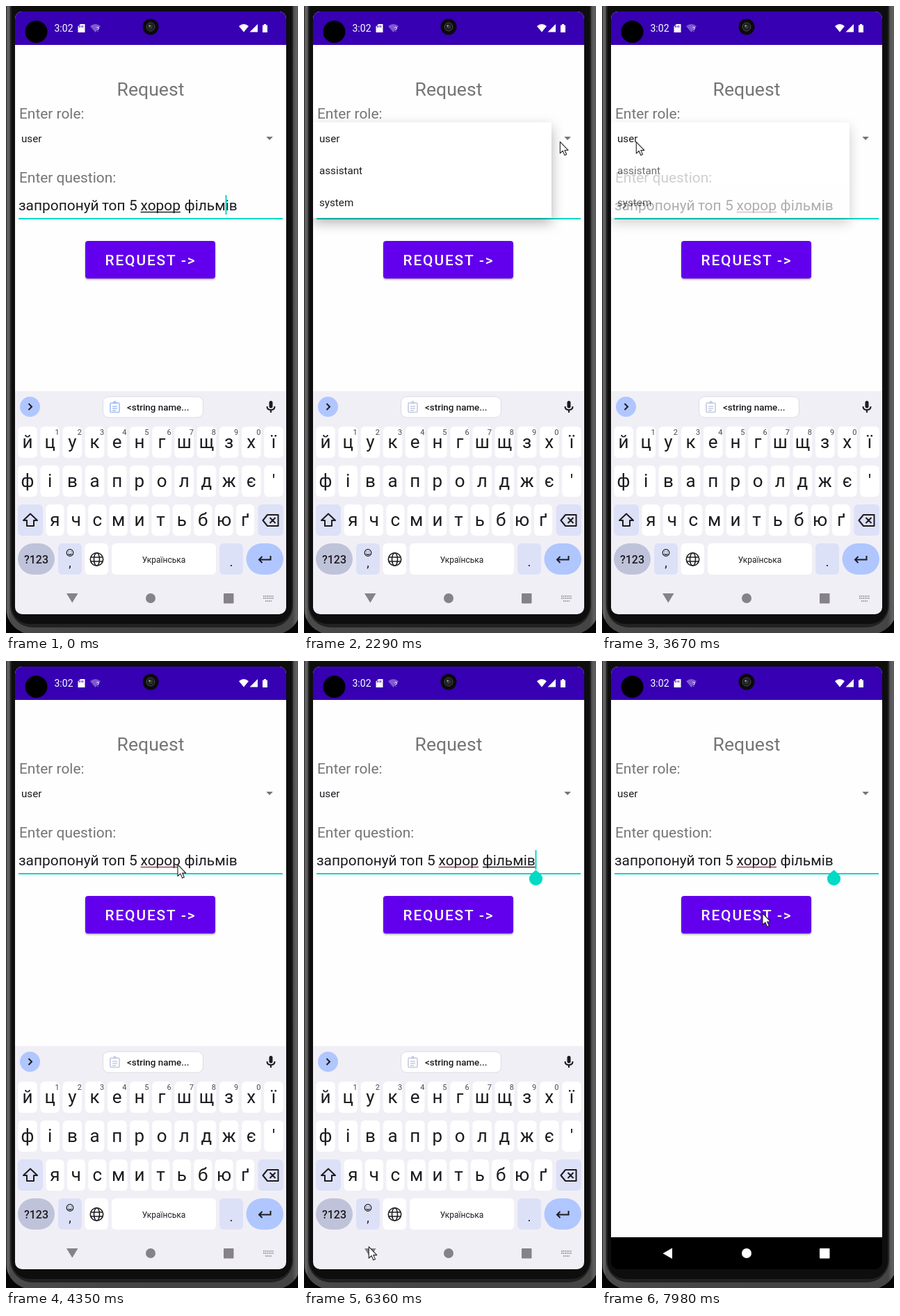
An HTML page that plays this animation: 420 px wide and 902 px high, repeating every 8 s.

```html
<!DOCTYPE html>
<html lang="uk">
<head>
<meta charset="utf-8">
<title>Request</title>
<style>
html, body { margin: 0; width: 100%; height: 100%; overflow: hidden; background: #000; }
svg { display: block; width: 100vw; height: 100vh; font-family: Roboto, "Noto Sans", sans-serif; }
.grey { fill: #757575; }
.ink { fill: #1d1b20; }
.line { fill: none; stroke: #1d1b20; stroke-width: 2; }
</style>
</head>
<body>
<svg viewBox="0 0 420 902">
  <defs>
    <clipPath id="screen"><rect x="13" y="8" width="390" height="867" rx="10"/></clipPath>
    <linearGradient id="rim">
      <stop offset="0" stop-color="#2c2c2c"/><stop offset=".006" stop-color="#6a6a6a"/>
      <stop offset=".014" stop-color="#4a4a4a"/><stop offset=".5" stop-color="#444"/>
      <stop offset=".97" stop-color="#444"/><stop offset=".985" stop-color="#606060"/>
      <stop offset="1" stop-color="#4a4a4a"/>
    </linearGradient>
    <filter id="shade" x="-20%" y="-30%" width="140%" height="170%">
      <feDropShadow dx="0" dy="7" stdDeviation="9" flood-opacity=".3"/>
    </filter>
    <filter id="lift" x="-5%" y="-10%" width="110%" height="130%">
      <feDropShadow dx="0" dy="1.5" stdDeviation="1.3" flood-opacity=".35"/>
    </filter>
  </defs>

  <rect width="420" height="902" fill="#050505"/>
  <rect x="0" y="-34" width="424" height="938" rx="38" fill="url(#rim)"/>
  <rect x="6" y="-30" width="407" height="924" rx="32" fill="#222"/>
  <rect x="8" y="-30" width="403" height="919" rx="26" fill="#0e0e0e"/>

  <g clip-path="url(#screen)">
    <rect x="13" y="8" width="390" height="821" fill="#fefefe"/>
    <rect x="13" y="829" width="390" height="46" fill="#000"/>

    <rect x="13" y="8" width="390" height="48" fill="#3700b3"/>
    <circle cx="43.500" cy="37" r="16" fill="#000"/>
    <g fill="#fff">
      <text x="69.500" y="37" font-size="14">3:02</text>
      <path d="M107 26h6.500v12h-10v-8.500z"/>
      <path d="M121 29q7.500-6 15 0l-7.500 9z" opacity=".35"/>
      <text x="130" y="37" font-size="9">?</text>
      <path d="M335 29q7-6 14 0l-7 8.500z"/>
      <path d="M362 26v11.500h-11.500z"/>
      <path d="M369 27.500h2v-1.500h3v1.500h2v10.500h-7z"/>
    </g>
    <path d="M105.500 28v3M108 28v3M110.500 28v3" stroke="#3700b3"/>
    <circle cx="208" cy="30" r="11.500" fill="#0b0b0b"/>
    <circle cx="208" cy="30" r="6" fill="#1c1c1e" stroke="#4a4a4c"/>
    <circle cx="208" cy="30" r="3" fill="#353538"/>
    <circle cx="206.500" cy="28.500" r="1.200" fill="#9a9a9a"/>

    <g class="grey">
      <text x="208" y="129" font-size="26.600" text-anchor="middle">Request</text>
      <text x="19" y="162" font-size="20.900">Enter role:</text>
      <text x="19" y="254" font-size="20.900">Enter question:</text>
      <path d="M374.300 188h9.600l-4.800 5z"/>
    </g>
    <text class="ink" x="22" y="196" font-size="15.200">user</text>
    <g id="words" class="ink" font-size="20.900"></g>
    <path id="spell" d="M193.500 296.500h57.500" stroke-width="1.400"/>
    <path id="compose" d="M257 296.500h76" stroke="#222" stroke-width="1.400"/>
    <rect x="18" y="305" width="380" height="2" fill="#03dac5"/>
    <rect id="caret" y="272" width="2" height="28" fill="#03dac5"/>
    <g filter="url(#lift)"><rect x="114" y="338" width="187" height="54" rx="4" fill="#6200ee"/></g>
    <text x="142.500" y="373" font-size="20.900" font-weight="500" letter-spacing="1.870" fill="#fff">REQUEST -&gt;</text>
    <path id="handle" d="M333.500 300.500l6.800 6a9.600 9.600 0 1 1-13.600 0z" fill="#03dac5"/>

    <g id="menu" font-size="15.200">
      <rect x="13" y="167.500" width="343" height="137" fill="#fff" filter="url(#shade)"/>
      <text class="ink" x="22" y="196">user</text>
      <text class="ink" x="22" y="242">assistant</text>
      <text class="ink" x="22" y="287.500">system</text>
    </g>

    <g id="keyboard">
      <rect x="13" y="554" width="390" height="330" fill="#f1eff6"/>
      <g id="keys"></g>
      <circle cx="34.500" cy="576.500" r="14.500" fill="#b0c6ff"/>
      <path class="line" d="M32.500 572l4.500 4.500-4.500 4.500"/>
      <g id="chip">
        <rect x="139.500" y="562" width="144" height="30" rx="8" fill="#fff" stroke="#dcdbe3"/>
        <g id="clip" fill="none" stroke-width="1.600">
          <rect x="150" y="571" width="13" height="13.500" rx="1.500"/>
          <path d="M153.500 571.500h6M153 576h7M153 579h7M153 582h5"/>
          <circle cx="156.500" cy="570" r="1.300"/>
        </g>
        <text class="ink" x="174" y="582" font-size="13.400" font-weight="500">&lt;string name...</text>
      </g>
      <rect class="ink" x="378.500" y="568" width="5" height="10.500" rx="2.500"/>
      <path class="line" d="M375.500 576q0 5 5.500 5t5.500-5M381 581v4" stroke-width="1.600"/>

      <path class="line" d="M35 730.500l10 9.500h-5v8h-10v-8h-5z" stroke-linejoin="round"/>
      <path class="line" d="M376 732h15.500v16h-15.500l-6.500-8zM379.500 736l8 8M387.500 736l-8 8" stroke-linejoin="round"/>
      <text class="ink" x="43.500" y="801.500" font-size="16" font-weight="500" text-anchor="middle">?123</text>
      <circle class="line" cx="92" cy="786.500" r="4.800" style="stroke-width:1.200"/>
      <path class="line" d="M89.500 788q2.500 2.500 5 0M90.200 784.800v1M93.800 784.800v1" style="stroke-width:1.200"/>
      <text class="ink" x="92" y="807" font-size="18" text-anchor="middle">,</text>
      <g class="line" style="stroke-width:1.600">
        <circle cx="130.500" cy="796" r="9.200"/>
        <ellipse cx="130.500" cy="796" rx="4" ry="9.200"/>
        <path d="M122 793h17M122 799h17"/>
      </g>
      <text class="ink" x="227" y="800.500" font-size="12" text-anchor="middle">Українська</text>
      <text class="ink" x="324" y="806" font-size="19" text-anchor="middle">.</text>
      <path class="line" d="M380.500 791v5.500h-16M368.500 792l-4.500 4.500 4.500 4.500"/>
      <path d="M370 849h15M370 852h15M373 856h9" stroke="#858389" stroke-width="1.600" stroke-dasharray="1.600 1"/>
    </g>

    <rect id="ripple" x="48" y="829" width="94" height="46" rx="23" opacity=".15"/>
    <g id="nav">
      <path id="back"/>
      <circle cx="208" cy="852" r="7"/>
      <rect x="313" y="845" width="14.500" height="14.500" rx="1"/>
    </g>
  </g>

  <path id="mouse" d="M0 0v16.500l3.900-3.600 2.700 6.300 2.700-1.200-2.700-6h5z" fill="#fff" stroke="#222" stroke-width="1.100" stroke-linejoin="round"/>
</svg>
<script>
const LOOP = 8000;
const el = id => document.getElementById(id);
const set = (id, attrs) => { for (const k in attrs) el(id).setAttribute(k, attrs[k]); };
const show = (id, on) => set(id, { visibility: on ? 'visible' : 'hidden' });
const clamp = v => Math.max(0, Math.min(1, v));
const ramp = (t, from, to) => clamp((t - from) / (to - from));
const within = (t, from, to) => t >= from && t < to;
const smooth = u => u * u * (3 - 2 * u);

function add(parent, tag, attrs, text) {
  const node = document.createElementNS('http://www.w3.org/2000/svg', tag);
  for (const k in attrs) node.setAttribute(k, attrs[k]);
  if (text) node.textContent = text;
  el(parent).append(node);
}

const key = (x, y, width, fill = '#fff', rx = 6) =>
  add('keys', 'rect', { x, y, width, height: 45, rx, fill });

function keyRow(letters, first, pitch, width, y, digits = '') {
  [...letters].forEach((letter, i) => {
    const x = first + i * pitch;
    const digit = digits[i - 1];
    key(x - width / 2, y, width);
    add('keys', 'text', { x, y: y + 30.5, 'font-size': 26, 'text-anchor': 'middle', class: 'ink' }, letter);
    if (digit) add('keys', 'text', { x: x + 10.5, y: y + 12, 'font-size': 11, 'text-anchor': 'middle', fill: '#46464f' }, digit);
  });
}

keyRow('йцукенгшщзхї', 31, 32.18, 27.5, 605, '1234567890');
keyRow("фівапролджє'", 31, 32.18, 27.5, 661);
keyRow('ячсмитьбюґ', 70.5, 30.4, 26, 717);
key(17, 717, 36, '#dde1f7');
key(362.5, 717, 36.5, '#dde1f7');
key(17, 773, 53, '#bfc3da', 22.5);
key(75, 773, 34, '#dde1f7');
key(113.5, 773, 33.5);
key(152, 773, 150);
key(307, 773, 34, '#dde1f7');
key(345.5, 773, 53.5, '#b0c6ff', 22.5);

[['запропонуй', 18], ['топ', 138], ['5', 177], ['хорор', 193.5], ['фільмів', 256.5]]
  .forEach(([word, x]) => add('words', 'text', { x, y: 294 }, word));

// Pointer stops: time, x, y
const stops = [
  [200, 390, 812], [900, 384, 421], [1470, 386, 206], [1740, 381, 191], [2150, 381, 192],
  [2600, 326, 207], [3150, 46, 194], [3620, 46, 194], [4280, 247, 293], [4420, 247, 293],
  [4850, 340, 294], [5110, 321, 305], [5290, 321, 305], [5940, 66, 812], [6200, 92, 842],
  [6480, 94, 843], [6640, 118, 728], [7160, 231, 363], [LOOP, 231, 363]
];

function pointer(t) {
  const i = Math.max(1, stops.findIndex(s => s[0] > t));
  const [t0, x0, y0] = stops[i - 1], [t1, x1, y1] = stops[i];
  const u = smooth(ramp(t, t0, t1));
  return [x0 + (x1 - x0) * u, y0 + (y1 - y0) * u];
}

const TAP = 4920, BACK = 6400, HIDE = 6480, GONE = 6740;

function caretOn(t) {
  if (t < TAP) return (t + 250) % 1000 < 500;
  if (t < BACK) return (t - TAP) % 1000 < 500;
  return within(t, BACK, 6940) || within(t, 7440, 7970);
}

function draw(t) {
  const [x, y] = pointer(t);
  set('mouse', { transform: `translate(${x} ${y})` });
  show('mouse', t >= stops[0][0]);

  set('menu', { opacity: ramp(t, 1900, 2050) * (1 - ramp(t, 3620, 3760)) });
  show('menu', within(t, 1900, 3760));

  set('caret', { x: t < TAP ? 315.5 : 332.5 });
  show('caret', caretOn(t));
  show('handle', t >= TAP);
  show('compose', within(t, TAP, HIDE));
  set('spell', { stroke: t < 3620 ? '#222' : '#8b4a5e' });
  set('clip', { stroke: t < 1900 ? '#a3bdf8' : '#c3cbe0' });

  const slide = ramp(t, HIDE, GONE) ** 2;
  set('keyboard', { transform: `translate(0 ${275 * slide})`, opacity: clamp(1 - 1.7 * slide) });
  show('chip', t < HIDE);
  show('ripple', within(t, BACK, GONE));

  const closed = t >= GONE;
  set('nav', { fill: closed ? '#fff' : '#858389', opacity: within(t, HIDE, GONE) ? 0.4 : 1 });
  set('back', { d: closed ? 'M101 844.500v15.500l-13.500-7.700z' : 'M87 845h16.500l-8.200 13.500z' });
}

let start;
function tick(now) {
  start ??= now;
  draw((now - start) % LOOP);
  requestAnimationFrame(tick);
}
draw(0);
requestAnimationFrame(tick);
</script>
</body>
</html>
```
